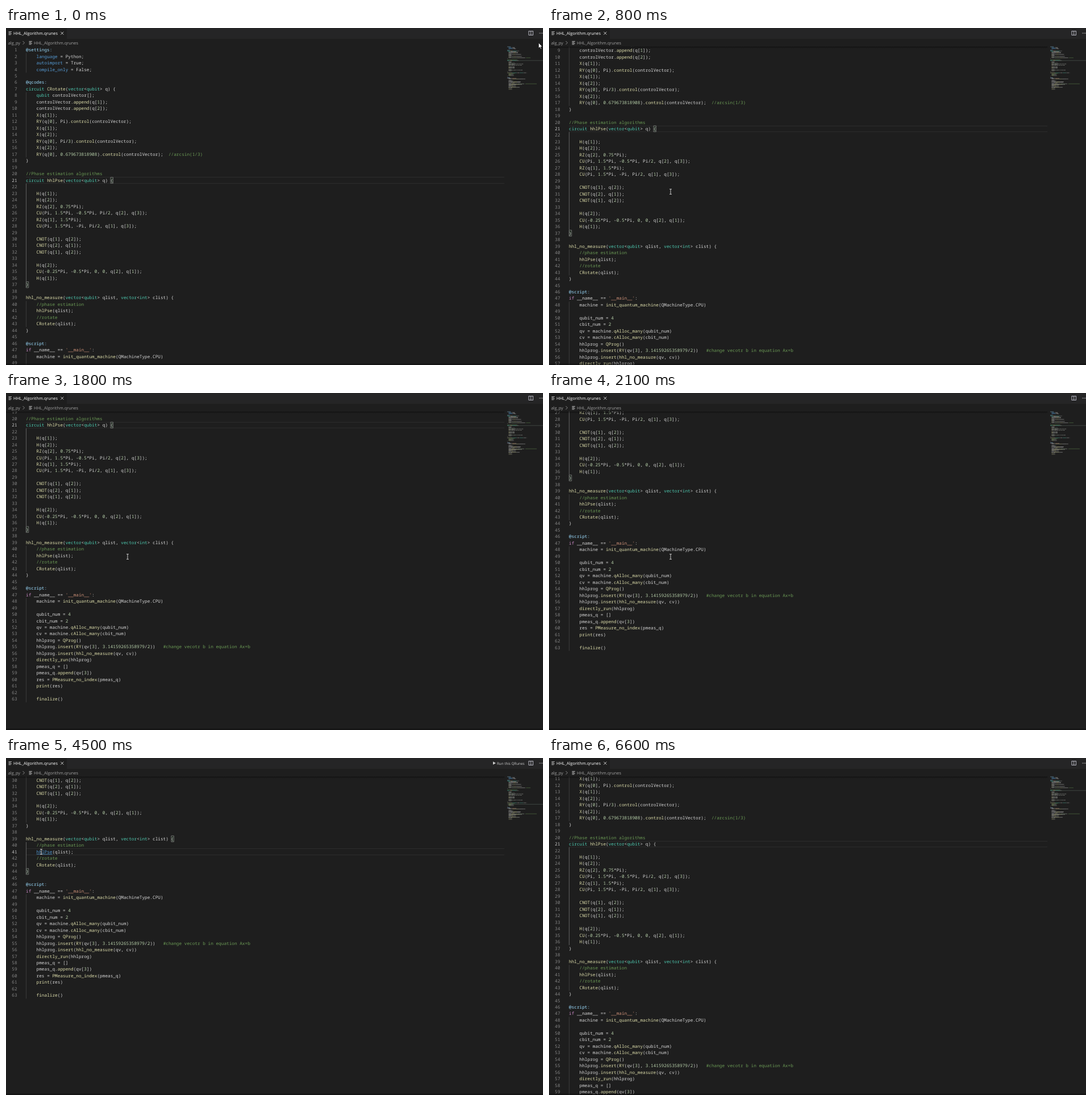
An HTML page with a canvas that plays this animation: 945x593 px, repeating every 6.7 s.

```html
<!DOCTYPE html>
<html lang="en">
<head>
<meta charset="utf-8">
<title>Code editor</title>
<style>
  html, body { margin: 0; width: 100%; height: 100%; overflow: hidden; background: #1e1e1e; }
  canvas { display: block; }
</style>
</head>
<body>
<canvas id="stage" width="945" height="593"></canvas>
<script>
const SOURCE = `@settings:
    language = Python;
    autoimport = True;
    compile_only = False;

@qcodes:
circuit CRotate(vector<qubit> q) {
    qubit controlVector[];
    controlVector.append(q[1]);
    controlVector.append(q[2]);
    X(q[1]);
    RY(q[0], Pi).control(controlVector);
    X(q[1]);
    X(q[2]);
    RY(q[0], Pi/3).control(controlVector);
    X(q[2]);
    RY(q[0], 0.679673818908).control(controlVector);  //arcsin(1/3)
}

//Phase estimation algorithms
circuit hhlPse(vector<qubit> q) {

    H(q[1]);
    H(q[2]);
    RZ(q[2], 0.75*Pi);
    CU(Pi, 1.5*Pi, -0.5*Pi, Pi/2, q[2], q[3]);
    RZ(q[1], 1.5*Pi);
    CU(Pi, 1.5*Pi, -Pi, Pi/2, q[1], q[3]);

    CNOT(q[1], q[2]);
    CNOT(q[2], q[1]);
    CNOT(q[1], q[2]);

    H(q[2]);
    CU(-0.25*Pi, -0.5*Pi, 0, 0, q[2], q[1]);
    H(q[1]);
}

hhl_no_measure(vector<qubit> qlist, vector<int> clist) {
    //phase estimation
    hhlPse(qlist);
    //rotate
    CRotate(qlist);
}

@script:
if __name__ == '__main__':
    machine = init_quantum_machine(QMachineType.CPU)

    qubit_num = 4
    cbit_num = 2
    qv = machine.qAlloc_many(qubit_num)
    cv = machine.cAlloc_many(cbit_num)
    hhlprog = QProg()
    hhlprog.insert(RY(qv[3], 3.14159265358979/2))   #change vecotr b in equation Ax=b
    hhlprog.insert(hhl_no_measure(qv, cv))
    directly_run(hhlprog)
    pmeas_q = []
    pmeas_q.append(qv[3])
    res = PMeasure_no_index(pmeas_q)
    print(res)

    finalize()`;

const LOOP = 6700, W = 945, H = 593;
const LEFT = 35, TOP = 32.7, PITCH = 11.479, CHAR = 4.647, NOTCH = 30.22;
const CODE_FONT = '7.745px "Noto Sans Mono", "DejaVu Sans Mono", monospace';
const uiFont = size => `${size}px "Open Sans", "Noto Sans", sans-serif`;

// One capture group per colour, in the same order as COLORS.
const TOKEN = /(\/\/.*|#.*)|(@\w+:)|('[^']*')|\b(if)\b|\b(circuit|vector|qubit|int)\b|\b(language|autoimport|compile_only)\b|([A-Za-z_]\w*)(?=\()|(\b\d[\d.]*)|\w+|[^\s\w]+/g;
const COLORS = ['#6a9955', '#9cdcfe', '#ce9178', '#c586c0', '#4ec9b0', '#569cd6', '#dcdcaa', '#b5cea8'];
const PLAIN = '#d4d4d4';
const lines = SOURCE.split('\n').map(line => [...line.matchAll(TOKEN)].map(m => ({
  text: m[0], col: m.index, color: COLORS[m.slice(1).findIndex(Boolean)] || PLAIN
})));
const GUIDES = [[2, 4], [8, 17], [22, 36], [40, 43], [48, 63]];

// [time, wheel notches]; the jump to the definition lands between notches
const SCROLL = [[0, 0], [600, 1], [700, 2], [800, 3], [900, 4], [1500, 6], [1800, 7],
  [1900, 8], [2100, 10], [2500, 11], [4600, 3.86]];
// [start, end, x, y]: glide to x, y
const MOVES = [[0, 600, 214, 288], [2600, 3200, 69.5, 166], [3800, 4000, 62, 165],
  [4700, 5400, 835, 72], [5400, 6000, 952, 33]];

const ctx = document.getElementById('stage').getContext('2d');
ctx.textRendering = 'geometricPrecision';

function rect(x, y, w, h, color) {
  ctx.fillStyle = color;
  ctx.fillRect(x, y, w, h);
}

function label(text, x, y, color, font) {
  ctx.font = font;
  ctx.fillStyle = color;
  ctx.fillText(text, x, y);
}

function stroke(points, color, width = 1) {
  ctx.strokeStyle = color;
  ctx.lineWidth = width;
  ctx.beginPath();
  points.forEach(([x, y], i) => i ? ctx.lineTo(x, y) : ctx.moveTo(x, y));
  ctx.stroke();
}

function polygon(points, fill, outline) {
  ctx.beginPath();
  points.forEach(([x, y]) => ctx.lineTo(x, y));
  ctx.closePath();
  ctx.fillStyle = fill;
  ctx.fill();
  if (outline) {
    ctx.strokeStyle = outline;
    ctx.lineWidth = 0.6;
    ctx.stroke();
  }
}

function pointerAt(t) {
  let x = 937.3, y = 26;
  for (const [start, end, toX, toY] of MOVES) {
    const p = Math.min(1, Math.max(0, (t - start) / (end - start)));
    const e = p * p * (3 - 2 * p);
    x += (toX - x) * e;
    y += (toY - y) * e;
  }
  return [x, y];
}

function drawCode(t, scroll) {
  const lineTop = n => TOP + (n - 1) * PITCH - scroll;
  const colX = col => LEFT + col * CHAR;
  const clicked = t >= 4400 && t < 4600;
  const linked = t >= 4100 && t < 4600;
  const current = clicked ? 41 : 21;
  const activeGuide = clicked ? 40 : 22;
  const brackets = clicked ? [[39, 55], [44, 0]] : t < 4400 ? [[21, 32], [37, 0]] : [];

  ctx.save();
  ctx.beginPath();
  ctx.rect(0, 32.5, W, H);
  ctx.clip();

  for (const y of [lineTop(current), lineTop(current + 1) - 1])
    rect(LEFT, Math.round(y), 842, 1, '#2c2c2c');
  for (const [from, to] of GUIDES)
    rect(LEFT, lineTop(from), 0.8, (to - from + 1) * PITCH, from === activeGuide ? '#707070' : '#404040');
  for (const [n, col] of brackets) {
    ctx.fillStyle = 'rgba(0,100,0,.1)';
    ctx.strokeStyle = '#888';
    ctx.lineWidth = 0.8;
    ctx.beginPath();
    ctx.rect(colX(col) + 0.3, lineTop(n) + 0.5, CHAR - 0.2, PITCH - 1);
    ctx.fill();
    ctx.stroke();
  }

  lines.forEach((tokens, i) => {
    const n = i + 1, base = lineTop(n) + 8.4;
    if (base < 25 || base > H + 10) return;
    ctx.textAlign = 'right';
    label(n, 19.6, base, n === current ? '#c6c6c6' : '#858585', CODE_FONT);
    ctx.textAlign = 'left';
    for (const { text, col, color } of tokens) {
      const link = linked && n === 41 && text === 'hhlPse';
      label(text, colX(col), base, link ? '#4e94ce' : color, CODE_FONT);
      if (link) rect(colX(col), base + 1, text.length * CHAR, 0.8, '#4e94ce');
    }
  });

  const caretOn = Math.floor((t - 4400) / 500) % 2 === 0;
  if (t >= 4600 && t < 6500 && caretOn) rect(LEFT, lineTop(21), 1.2, PITCH, '#aeafad');

  if (scroll > 0) {
    const shadow = ctx.createLinearGradient(0, 32.5, 0, 36);
    shadow.addColorStop(0, 'rgba(0,0,0,.45)');
    shadow.addColorStop(1, 'rgba(0,0,0,0)');
    rect(0, 32.5, 877, 3.5, shadow);
  }
  ctx.restore();

  // Minimap
  const mapY = n => 32.6 + (n - 1) * 1.207;
  rect(882, mapY(current), 63, 1, '#3d4440');
  ctx.globalAlpha = 0.5;
  lines.forEach((tokens, i) => {
    for (const { text, col, color } of tokens)
      rect(882 + col * 0.612, mapY(i + 1), text.length * 0.612, 0.85, color);
  });
  ctx.globalAlpha = 1;
}

function listIcon(x, y) {
  [5.5, 4, 5.5, 4].forEach((w, i) => rect(x, y + i * 1.8, w, 0.9, '#c0c0c0'));
}

function drawChrome(t) {
  rect(0, 0, W, 19, '#252526');
  rect(0, 0, 107, 19, '#1e1e1e');
  listIcon(4.5, 6);
  label('HHL_Algorithm.qrunes', 13, 12, '#fff', uiFont(7.36));
  stroke([[96.3, 6.7], [101.3, 11.7]], '#ddd', 0.9);
  stroke([[101.3, 6.7], [96.3, 11.7]], '#ddd', 0.9);

  label('alg_py', 3.7, 28.7, '#a0a0a0', uiFont(7.36));
  stroke([[29.5, 23], [32.5, 26], [29.5, 29]], '#a0a0a0', 0.8);
  listIcon(40.5, 23);
  label('HHL_Algorithm.qrunes', 49, 28.7, '#a0a0a0', uiFont(7.36));

  if (t >= 4400 && t < 6500) {
    polygon([[857, 6.2], [862, 9], [857, 11.8]], '#ccc');
    label('Run this QRunes', 864, 11.5, '#ccc', uiFont(6.28));
  }
  ctx.strokeStyle = '#c5c5d0';
  ctx.lineWidth = 0.9;
  ctx.strokeRect(920, 5.5, 7.4, 7);
  stroke([[923.7, 5.5], [923.7, 12.5]], '#c5c5d0', 0.9);
  for (const x of [938.5, 941, 943.5]) rect(x, 8.5, 1.2, 1.2, '#c5c5c5');

  rect(0, 590.5, W, 2.5, 'rgba(0,0,0,.35)');
}

function drawPointer(t) {
  const [x, y] = pointerAt(t);
  const at = points => points.map(([dx, dy]) => [x + dx, y + dy]);
  if (t >= 4100 && t < 4400) {
    polygon(at([[-1, 0], [0.8, 0], [0.8, 5], [5.5, 6], [6, 8], [5, 13], [-1, 13], [-4, 8.5], [-3, 7.5], [-1, 9]]), '#fff', '#000');
  } else if (x > 878) {
    polygon(at([[0, 0], [0, 9.6], [2.1, 7.6], [3.6, 11], [5, 10.4], [3.6, 7], [6.5, 7]]), '#fff', '#000');
  } else {
    stroke(at([[0, -4.5], [0, 4.5]]), '#e0e0e0', 0.9);
    for (const dy of [-4.5, 4.5]) stroke(at([[-2, dy], [2, dy]]), '#e0e0e0', 0.8);
  }
}

function frame(now) {
  const t = Math.floor(now % LOOP / 100) * 100;
  const notches = SCROLL.filter(([start]) => start <= t).pop()[1];
  rect(0, 0, W, H, '#1e1e1e');
  drawCode(t, notches * NOTCH);
  drawChrome(t);
  drawPointer(t);
  requestAnimationFrame(frame);
}
requestAnimationFrame(frame);
</script>
</body>
</html>
```
